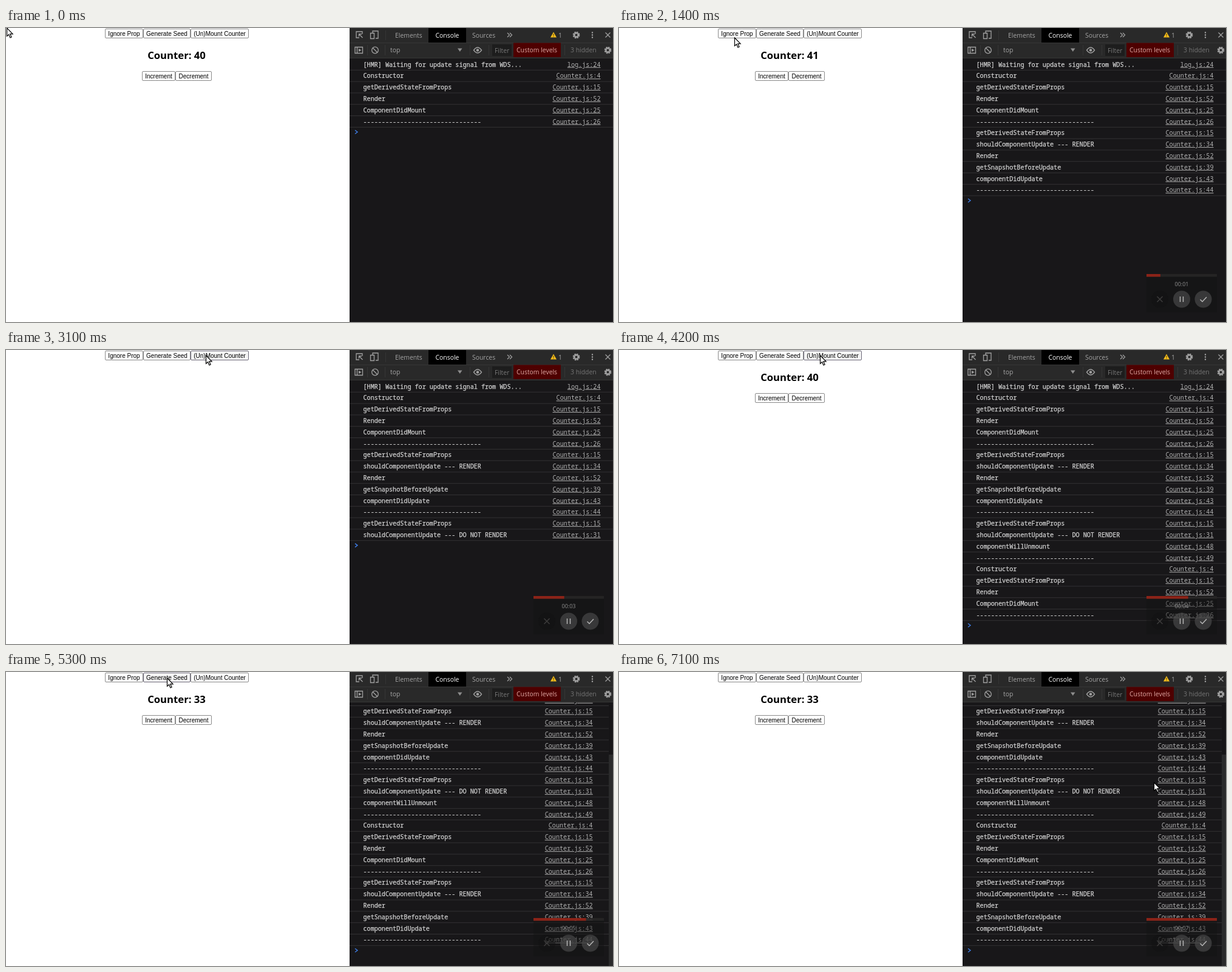
Recreate the animation shown at these times as an HTML page. Size 1000 by 484 pixels, loop 7.2 s.

```html
<!DOCTYPE html>
<html lang="en">
<head>
<meta charset="utf-8">
<title>Counter lifecycle</title>
<style>
html, body { margin: 0; width: 100%; height: 100%; overflow: hidden; background: #fff; }
svg { display: block; width: 1000px; height: 484px; }
.btn rect { fill: #fcfcfc; stroke: #8c8c8c; }
.btn.hover rect { fill: #f4f4f4; stroke: #6c6878; }
.btn text { font: 10px "Liberation Sans", Arial, sans-serif; text-anchor: middle; }
#count { font: bold 16.7px "Open Sans", sans-serif; text-anchor: middle; }
.ui text { font: 10.4px "Open Sans", sans-serif; fill: #a5a5a5; }
.ui .icon { fill: none; stroke: #a0a0a0; stroke-width: 1.3; }
.ui .sep { stroke: #363636; }
#log text { font: 500 10.14px "Noto Sans Mono", "DejaVu Sans Mono", monospace; fill: #d2d2d2; stroke: #d2d2d2; stroke-width: .25; }
#log .link { fill: #b0b0b0; stroke: none; text-anchor: end; text-decoration: underline; }
#log line { stroke: #323133; }
#timer { font: 9px "Open Sans", sans-serif; fill: #909090; text-anchor: middle; }
</style>
</head>
<body>
<svg viewBox="0 0 1000 484">
  <defs>
    <clipPath id="body"><rect x="566" y="50" width="434" height="434"/></clipPath>
    <g id="gear">
      <circle r="4.6" fill="none" stroke="#a0a0a0" stroke-width="2.6" stroke-dasharray="2.4 1.21"/>
      <circle r="3.2" fill="none" stroke="#a0a0a0" stroke-width="2.4"/>
    </g>
  </defs>

  <g id="buttons"></g>
  <g id="counter"><text id="count" x="281" y="50.7"></text></g>

  <rect x="566" width="434" height="484" fill="#181719"/>
  <g clip-path="url(#body)">
    <g id="log"></g>
    <path id="prompt" d="M575 -3l4 3l-4 3" fill="none" stroke="#3f7ee8" stroke-width="1.4"/>
    <g id="scrollbar">
      <rect x="993" y="50" width="7" height="434" fill="#161517"/>
      <rect x="993" y="136" width="7" height="348" fill="#2a2a2b"/>
    </g>
  </g>

  <g class="ui">
    <rect x="566" width="434" height="50" fill="#292929"/>
    <rect x="696" width="62" height="24" fill="#000"/>
    <path class="sep" d="M566 24.5H1000M566 49.5H1000M625.5 4V20M595.5 28V45M624.5 28V45M764.5 28V45M795.5 28V45M920.5 28V45"/>
    <text x="641" y="15.5">Elements</text>
    <text x="707.5" y="15.5" style="fill:#fff">Console</text>
    <text x="768" y="15.5">Sources</text>
    <text x="910" y="15.5">1</text>
    <path class="icon" d="M582 16H577V6H587V10M581 9.5l6.5 6.5M581.5 14V10H586M604 8V5H613V17H609M600.5 8.5H606.5V17.5H600.5ZM826 8l3.5 3.5l-3.5 3.5M830 8l3.5 3.5l-3.5 3.5M987.5 7.5l8 8M995.5 7.5l-8 8"/>
    <path d="M902 6.5l5 9h-10z" fill="#f4bd1c"/>
    <path d="M902 9.5v3M902 13.5v1" stroke="#3a2b00"/>
    <use href="#gear" x="939.5" y="11.5"/>
    <path d="M966 7.5h.01M966 11.5h.01M966 15.5h.01" stroke="#a5a5a5" stroke-width="2.4" stroke-linecap="round"/>

    <path class="icon" d="M575 31.5H587.5V41.5H575ZM578.5 31.5V41.5M604 32.5l8 8"/>
    <path d="M581 34l4.5 2.5l-4.5 2.5z" fill="#a0a0a0"/>
    <circle class="icon" cx="608" cy="36.5" r="5.3"/>
    <text x="633" y="40.3">top</text>
    <path d="M744 33.5h7.5l-3.75 5.5z" fill="#8d8d8d"/>
    <path class="icon" d="M770.5 36.5q6.5 -9 13 0q-6.5 9 -13 0z"/>
    <circle cx="777" cy="36.5" r="2.3" fill="#a0a0a0"/>
    <rect x="801" y="27" width="32" height="19" fill="#1d1d1d"/>
    <text x="805" y="40.5" style="fill:#777">Filter</text>
    <rect x="836" y="24.5" width="78" height="23.5" fill="#4e0000"/>
    <text x="841" y="40.3" style="fill:#dfa9a4">Custom levels</text>
    <text x="930" y="40.3" style="fill:#757575">3 hidden</text>
    <use href="#gear" x="991.5" y="36.5"/>
  </g>

  <g id="recorder">
    <rect x="869" y="405" width="116" height="63" fill="#131213" opacity=".45"/>
    <rect x="869" y="405" width="116" height="4.5" fill="#2a2929" opacity=".8"/>
    <rect id="bar" x="869" y="405" height="4.5" fill="#8b2318"/>
    <text id="timer" x="927" y="424.5"></text>
    <circle cx="891" cy="446.5" r="14" fill="#111" opacity=".5"/>
    <g fill="#484848" opacity=".7">
      <circle cx="927" cy="446.5" r="14"/>
      <circle cx="962.5" cy="446.5" r="14"/>
    </g>
    <g fill="none" stroke-width="1.5">
      <path d="M886.5 442l9 9M895.5 442l-9 9" stroke="#3d3c3c"/>
      <path d="M924.5 442v9M929.5 442v9M957.5 447l3.5 3.5l7 -7.5" stroke="#b5b5b5"/>
    </g>
  </g>

  <path id="cursor" d="M.5 0V13.5L3.6 10.7L5.9 16L8.1 15L5.8 9.9H10.1Z" fill="#fff" stroke="#000" stroke-width="1.2"/>
</svg>
<script>
const LOOP = 7200, STEP = 100, ROW = 18.8;
const $ = id => document.getElementById(id);

function add(parent, tag, attrs, text = '') {
  const el = document.createElementNS('http://www.w3.org/2000/svg', tag);
  for (const k in attrs) el.setAttribute(k, attrs[k]);
  el.textContent = text;
  return parent.appendChild(el);
}

const buttons = [
  ['Ignore Prop', 163, 2, 63], ['Generate Seed', 226, 2, 78], ['(Un)Mount Counter', 304, 2, 96],
  ['Increment', 224, 72, 55], ['Decrement', 279, 72, 60],
].map(([label, x, y, w]) => {
  const el = add($(y > 50 ? 'counter' : 'buttons'), 'g', { class: 'btn' });
  add(el, 'rect', { x: x + .5, y: y - .5, width: w - 1, height: 15, rx: 1.5 });
  add(el, 'text', { x: x + w / 2, y: y + 10.8 }, label);
  return { el, x, y, w };
});

const dashes = '-'.repeat(32);
const derived = ['getDerivedStateFromProps', 15];
const mount = [['Constructor', 4], derived, ['Render', 52], ['ComponentDidMount', 25], [dashes, 26]];
const update = [derived, ['shouldComponentUpdate --- RENDER', 34], ['Render', 52],
  ['getSnapshotBeforeUpdate', 39], ['componentDidUpdate', 43], [dashes, 44]];
const skip = [derived, ['shouldComponentUpdate --- DO NOT RENDER', 31]];
const unmount = [['componentWillUnmount', 48], [dashes, 49]];
const first = [['[HMR] Waiting for update signal from WDS...', 24, 'log'], ...mount];

const batches = [[0, first], [1000, update], [2000, skip], [3200, unmount], [4200, mount], [5300, update]];
const rows = batches.flatMap(([at, list]) => list.map(row => [at, ...row])).map(([at, text, line, file = 'Counter'], i) => {
  const el = add($('log'), 'g', {}), y = 50.5 + i * ROW;
  add(el, 'text', { x: 588.5, y: y + 13 }, text);
  const link = add(el, 'text', { class: 'link', y: y + 13 }, `${file}.js:${line}`);
  const rule = add(el, 'line', { x1: 566, y1: y + ROW, y2: y + ROW });
  return { at, el, link, rule };
});

// [time, value]; an empty value means the counter is unmounted
const counts = [[0, 40], [900, 41], [3100, ''], [4100, 40], [5200, 33]];

// [time, x, y]
const path = [[0, 1, 0], [100, 1, 0], [700, 250, 78], [1000, 250, 78], [1400, 190, 16], [1700, 190, 11],
  [2400, 190, 11], [2900, 329, 9], [3100, 329, 9], [4200, 331, 9], [4500, 331, 9], [5000, 265, 10],
  [5700, 265, 10], [6200, 175, 10], [6500, 175, 10], [7100, 881, 182], [LOOP, 881, 182]];

function cursorAt(t) {
  const i = path.findIndex(p => p[0] > t);
  const [t0, x0, y0] = path[i - 1], [t1, x1, y1] = path[i];
  const u = (t - t0) / (t1 - t0), e = u * u * (3 - 2 * u);
  return [x0 + (x1 - x0) * e, y0 + (y1 - y0) * e];
}

const show = (el, on) => el.style.display = on ? '' : 'none';

function draw(t) {
  const [cx, cy] = cursorAt(t);
  $('cursor').setAttribute('transform', `translate(${cx} ${cy})`);
  for (const { el, x, y, w } of buttons)
    el.classList.toggle('hover', cx >= x && cx < x + w && cy >= y && cy < y + 14);

  const count = counts.filter(c => c[0] <= t).pop()[1];
  show($('counter'), count !== '');
  $('count').textContent = `Counter: ${count}`;

  const shown = rows.filter(r => r.at <= t).length;
  const overflow = shown > 22, scroll = overflow ? -107.8 : 0;
  rows.forEach((r, i) => {
    show(r.el, i < shown);
    r.link.setAttribute('x', overflow ? 966.7 : 979.5);
    r.rule.setAttribute('x2', overflow ? 993 : 1000);
  });
  $('log').setAttribute('transform', `translate(0 ${scroll})`);
  $('prompt').setAttribute('transform', `translate(0 ${58.4 + shown * ROW + scroll})`);
  show($('scrollbar'), overflow);

  show($('recorder'), t >= STEP);
  $('bar').setAttribute('width', 116 * t / (LOOP - STEP));
  $('timer').textContent = `00:0${Math.floor(t / 1000)}`;
}

function tick() {
  const t = performance.now() % LOOP;
  draw(Math.floor(t / STEP) * STEP);
  requestAnimationFrame(tick);
}
tick();
</script>
</body>
</html>
```
